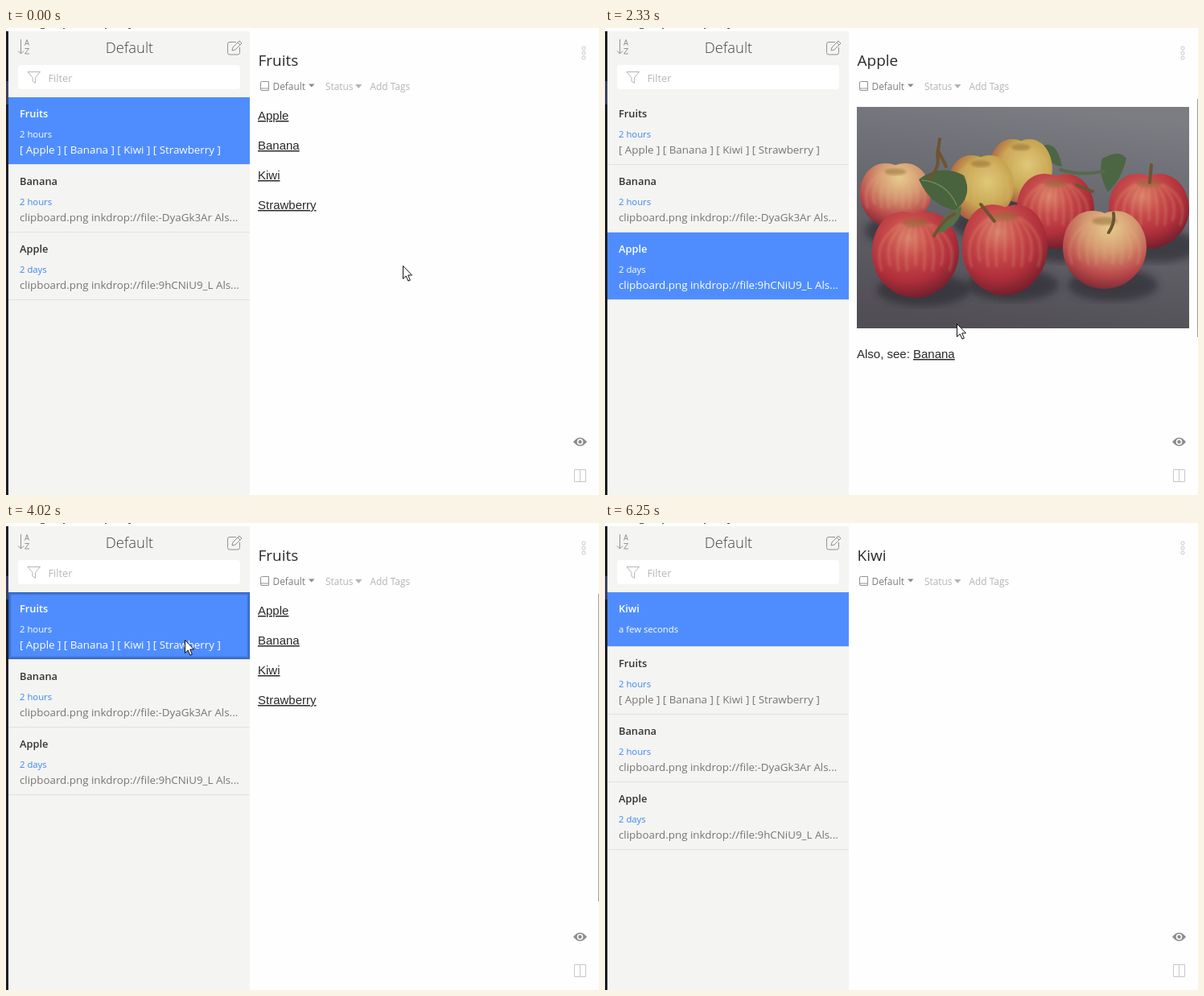
Recreate the animation shown at these times as an HTML page. Size 737 by 580 pixels, loop 6.78 s.

```html
<!DOCTYPE html>
<html lang="en">
<head>
<meta charset="utf-8">
<title>Linked notes</title>
<style>
html, body { margin: 0; width: 100%; height: 100%; overflow: hidden; background: #fefefe; }
svg { display: block; width: 737px; height: 580px; }
text { font-family: "Open Sans", "Noto Sans", sans-serif; }
.body { font: 15px "Liberation Sans", Arial, sans-serif; fill: #2a2a2a; }
.link { text-decoration: underline; }
.head { font-size: 18.4px; font-weight: 300; fill: #444; }
.title { font-size: 19px; fill: #2b2b2b; }
.name { font-size: 12.8px; font-weight: 600; fill: #333; }
.age { font-size: 11.3px; fill: #3b87f0; }
.text { font-size: 13.35px; fill: #767676; }
.sel text { fill: #fff; }
.meta { font-size: 11.9px; }
.icon { fill: none; stroke: #929292; stroke-width: 1; }
</style>
</head>
<body>
<svg viewBox="0 0 737 580">
  <defs>
    <linearGradient id="table" x1=".6" x2=".4" y2="1">
      <stop offset="0" stop-color="#7b7d83"/><stop offset=".45" stop-color="#66666d"/><stop offset="1" stop-color="#514e55"/>
    </linearGradient>
    <radialGradient id="red" cx=".42" cy=".3" r=".72">
      <stop offset="0" stop-color="#d9806a"/><stop offset=".35" stop-color="#c74a4a"/><stop offset=".7" stop-color="#b02f3b"/><stop offset="1" stop-color="#6f1f2c"/>
    </radialGradient>
    <radialGradient id="gold" cx=".6" cy=".4" r=".7">
      <stop offset="0" stop-color="#ddcb78"/><stop offset=".55" stop-color="#c7a550"/><stop offset="1" stop-color="#a34a3e"/>
    </radialGradient>
    <radialGradient id="blush" cx=".56" cy=".22" r=".8">
      <stop offset="0" stop-color="#e6cf8e"/><stop offset=".4" stop-color="#d39670"/><stop offset=".75" stop-color="#bb4a4b"/><stop offset="1" stop-color="#7c2a34"/>
    </radialGradient>
    <linearGradient id="peel" x1=".3" x2=".5" y2="1">
      <stop offset="0" stop-color="#eac63c"/><stop offset=".5" stop-color="#f8cf36"/><stop offset=".8" stop-color="#eab81f"/><stop offset="1" stop-color="#c98e10"/>
    </linearGradient>
    <filter id="soft"><feGaussianBlur stdDeviation="5"/></filter>
    <filter id="haze"><feGaussianBlur stdDeviation="1.6"/></filter>
    <clipPath id="photo"><rect x="313" y="98" width="413" height="275"/></clipPath>
  </defs>

  <rect width="737" height="580" fill="#fefefe"/>
  <rect x="3" y="4" width="300" height="576" fill="#f4f4f2"/>
  <path d="M0 4H3V580H0Z" fill="#1b1c27"/>
  <path d="M0 66H3V95H0Z" fill="#3b4160"/>
  <path d="M43 .5h5M71 .5h2M123 .5h2M152 .5h3" stroke="#555"/>

  <g class="icon">
    <path d="M18.5 14V32M15 28.5L18.5 32 22 28.5"/>
    <path d="M23.500 21.500L26 14.500 28.500 21.500M24.500 19.500H27.500M23.500 25.500H28.500L23.500 32H29"/>
    <path d="M286 17.500H278Q275.500 17.500 275.500 20V30.500Q275.500 33 278 33H288Q290.500 33 290.500 30.500V24M281 28L282 24 290 16 293 19 285 27ZM288 18L291 21"/>
  </g>
  <text class="head" x="153.500" y="30.500" text-anchor="middle">Default</text>
  <rect x="15" y="46" width="276" height="30" rx="4" fill="#fff"/>
  <path class="icon" d="M27 54.500H42.500L36.500 61.500V68.500L33 66V61.500Z" style="stroke:#b4b4b4"/>
  <text x="52.500" y="67" font-size="12.800" fill="#b6b6b6">Filter</text>

  <g class="meta">
    <path class="icon" d="M318.500 66.500H326.500V77.500H318Q316.500 77.500 316.500 76V68Q316.500 66.500 318.500 66.500ZM317 75H326.500"/>
    <text x="331.500" y="77" fill="#7c7c7c">Default</text>
    <path d="M376 69.500H383.500L379.750 73.500Z" fill="#888"/>
    <text x="397" y="77" fill="#b4b4b4">Status</text>
    <path d="M434 70H442.500L438.250 75Z" fill="#b5b5b5"/>
    <text x="452.500" y="77" fill="#b4b4b4">Add Tags</text>
  </g>
  <g class="icon" style="stroke:#c8c8c8">
    <circle cx="718" cy="25" r="2.100"/><circle cx="718" cy="31" r="2.100"/><circle cx="718" cy="37" r="2.100"/>
    <path d="M706.500 548.500H720.500V563.500H706.500ZM713.500 548.500V563.500"/>
  </g>
  <path d="M705 514Q713.500 503.500 722 514Q713.500 524.500 705 514Z" fill="#8c8c8c"/>
  <circle cx="713.500" cy="514" r="3" fill="#8c8c8c" stroke="#fefefe" stroke-width="1.600"/>

  <g id="list"></g>
  <g id="note"></g>
  <rect id="bar" x="736" y="88" width="1" fill="#a2a2a2"/>

  <g id="cursor" fill="#fff" stroke="#111" stroke-linejoin="round">
    <path id="arrow" d="M.5.5V16.500L4.200 13 6.900 19.200 9.300 18.200 6.700 12H11.500Z"/>
    <g id="hand">
      <path d="M-1 12.500V2Q-1 .5.700.5T2.400 2V8Q3 6.800 4.300 7 5.600 7.300 5.700 8.700 6.500 7.700 7.700 8.100 8.800 8.500 8.900 9.800 11.500 9 11.600 11.500V16Q11.500 18 10 20V23H1V20.500L-4 13.500Q-5.300 11 -3.500 10.400Q-2.400 10.300 -1 12.500Z"/>
      <path d="M2.400 8V12M5.700 8.700V12.500M8.900 9.800V12.500" fill="none"/>
    </g>
  </g>
</svg>
<script>
const LOOP = 6780;
const $ = id => document.getElementById(id);

const rows = {
  Kiwi: ['a few seconds', ''],
  Fruits: ['2 hours', '[ Apple ] [ Banana ] [ Kiwi ] [ Strawberry ]'],
  Banana: ['2 hours', 'clipboard.png inkdrop://file:-DyaGk3Ar Als...'],
  Apple: ['2 days', 'clipboard.png inkdrop://file:9hCNiU9_L Als...']
};

// start, selected row, open note, scrollbar length, row focus
const states = [
  [0, 'Fruits', 'Fruits', 0],
  [430, 'Fruits', 'Fruits', 382],
  [1430, 'Apple', 'Fruits', 382],
  [1520, 'Apple', 'Apple', 296],
  [2940, 'Banana', 'Apple', 296],
  [3000, 'Banana', 'Banana', 285],
  [3870, 'Fruits', 'Banana', 285, true],
  [3960, 'Fruits', 'Fruits', 382, true],
  [4910, 'Fruits', 'Fruits', 382],
  [5060, '', 'Fruits', 382],
  [5210, 'Kiwi', 'Kiwi', 0]
];

// start, end, from, bend, to, easing power
const moves = [
  [400, 1060, [493, 295], [390, 170], [328, 104], 2],
  [2100, 2330, [328, 104], [400, 235], [437, 367], 1.4],
  [2330, 2690, [437, 367], [434, 398], [417, 408], 1.6],
  [3280, 3420, [417, 408], [345, 315], [270, 220], 1.2],
  [3420, 3480, [270, 220], [258, 200], [252, 188], 1],
  [3690, 3810, [252, 188], [238, 165], [222, 145], 1.5],
  [4020, 4340, [222, 145], [290, 195], [349, 219], 1.8],
  [4400, 4630, [349, 219], [350, 203], [338, 189], 1.6],
  [5270, 5610, [338, 189], [220, 150], [128, 114], 1.8],
  [5860, 6190, [128, 114], [415, 405], [655, 478], 1.3],
  [6190, 6250, [655, 478], [684, 500], [690, 582], 1]
];

// link text and its box: left, baseline, width
const links = {
  Fruits: [['Apple', 313, 114, 38], ['Banana', 313, 151, 52], ['Kiwi', 313, 188, 28], ['Strawberry', 313, 225, 73]],
  Apple: [['Banana', 383, 410, 52]],
  Banana: [['Apple', 382, 444, 38]],
  Kiwi: []
};

const path = (d, fill, more = '') => `<path d="${d}" fill="${fill}" ${more}/>`;
const line = (d, stroke, width, more = '') =>
  path(d, 'none', `stroke="${stroke}" stroke-width="${width}" stroke-linecap="round" ${more}`);
const text = (cls, x, y, s) => `<text class="${cls}" x="${x}" y="${y}">${s}</text>`;
const oval = (x, y, rx, ry, fill, more = '') =>
  `<ellipse cx="${x}" cy="${y}" rx="${rx}" ry="${ry}" fill="${fill}" ${more}/>`;

// rounded shoulders, narrower base, pale streaks running down from the stem
function apple([x, y, rx, ry, id]) {
  let streaks = '';
  for (let i = -4; i < 5; i++) {
    const dx = i * rx / 4.6;
    streaks += `M${x + dx * .4} ${y - ry * .7}Q${x + dx * 1.15} ${y - ry * .3} ${x + dx * .9} ${y + ry * (.25 + i * i % 3 * .12)}`;
  }
  const body = `M${x} ${y - ry * .92}C${x + rx * .6} ${y - ry * 1.15} ${x + rx} ${y - ry * .6} ${x + rx} ${y - ry * .05}`
    + `S${x + rx * .55} ${y + ry} ${x} ${y + ry}S${x - rx} ${y + ry * .55} ${x - rx} ${y - ry * .05}`
    + `S${x - rx * .6} ${y - ry * 1.15} ${x} ${y - ry * .92}Z`;
  return path(body, `url(#${id})`) + line(streaks, '#e9b183', 2.5, 'opacity=".3" filter="url(#haze)"')
    + oval(x, y - ry * .72, rx * .3, ry * .1, '#8f6a35', 'opacity=".5" filter="url(#haze)"');
}

function apples() {
  const fruit = [
    [517, 177, 39, 40, 'gold'], [361, 208, 44, 41, 'blush'], [467, 199, 41, 42, 'gold'],
    [676, 227, 50, 47, 'red'], [560, 227, 48, 47, 'red'], [386, 281, 54, 54, 'red'],
    [497, 275, 53, 57, 'red'], [621, 275, 52, 49, 'blush']
  ];
  const shade = fruit.map(([x, y, r]) => oval(x + 10, y + 44, r + 4, 20, '#2c2930', 'filter="url(#soft)" opacity=".65"'));
  const balls = fruit.map(apple);
  const stem = d => line(d, '#6d5431', 4);
  return `<g clip-path="url(#photo)"><rect x="313" y="98" width="413" height="275" fill="url(#table)"/>`
    + shade.join('')
    + path('M545 146Q562 140 568 172Q548 170 545 146ZM618 162Q640 150 648 162Q642 188 625 204Q612 180 618 162Z', '#4c6643')
    + line('M566 176Q590 184 620 178', '#566a4b', 4)
    + balls.slice(0, 5).join('')
    + path('M390 188Q416 168 446 183Q458 208 436 226Q405 222 390 188Z', '#48633d')
    + line('M394 189Q425 192 437 220', '#6f8855', 1.5)
    + balls.slice(5).join('')
    + path('M415 247Q421 229 443 222Q443 244 415 255Z', '#567049')
    + stem('M402 187Q417 174 413 158L416 138M415 154L424 172') + stem('M409 258Q420 238 434 231')
    + stem('M484 240L467 219') + stem('M626 254Q634 242 632 230') + stem('M677 192L679 170')
    + stem('M586 195L606 203') + '</g>';
}

function bananas() {
  const peel = d => path(d, 'url(#peel)', 'stroke="#b27c0e" stroke-width="1.2"');
  const glow = d => line(d, '#fce583', 7, 'opacity=".55" filter="url(#haze)"');
  const dusk = d => line(d, '#a87408', 6, 'opacity=".5" filter="url(#haze)"');
  const tip = (x, y) => oval(x, y, 4, 8, '#382b20');
  return path('M420 340Q480 378 560 346Q630 340 652 290L600 280Z', '#bdbdbd', 'filter="url(#soft)" opacity=".7"')
    + peel('M453 152C480 191 548 207 660 212Q680 216 680 230L674 240C615 252 520 236 450 172Z')
    + glow('M490 193Q560 222 655 222') + dusk('M492 205Q560 240 650 243')
    + peel('M450 160C490 214 560 244 662 245L674 250 672 263C615 299 530 293 452 205Z')
    + glow('M485 214Q545 258 645 257') + dusk('M490 240Q550 292 625 280')
    + peel('M441 172C418 225 438 285 494 318C535 338 595 338 632 318L636 303C588 296 530 276 498 245C478 224 468 194 453 165Z')
    + glow('M443 200Q450 245 500 278Q540 300 610 308') + dusk('M434 245Q458 300 515 321Q570 334 615 322')
    + peel('M432 162C393 181 371 215 378 258C386 304 420 345 466 352C500 356 532 350 541 333L539 318C504 316 473 302 451 275C425 245 424 204 444 164Z')
    + glow('M405 205Q398 262 445 305Q475 328 520 328') + dusk('M388 275Q412 332 470 345Q505 348 530 341')
    + path('M430 158L457 154 464 184Q453 176 449 190Q443 178 436 196Q430 186 418 187Z', '#8f9a35', 'opacity=".75" filter="url(#haze)"')
    + path('M427 145L440 142 458 144 463 152 455 157 448 166 437 164 424 167Z', '#493026')
    + tip(676, 230) + tip(671, 255) + tip(633, 311) + tip(538, 327);
}

const pictures = { Apple: apples(), Banana: bananas() };

function drawList(sel, focus, withKiwi) {
  let y = 86, out = '';
  for (const [name, [age, body]] of Object.entries(rows)) {
    if (name === 'Kiwi' && !withKiwi) continue;
    const h = body ? 83 : 67, on = name === sel;
    out += `<g class="${on ? 'sel' : ''}" transform="translate(3 ${y})">`;
    if (on) out += `<rect width="300" height="${h}" fill="#4f8dff"/>`;
    if (on && focus) for (let i = 0; i < 4; i++)
      out += `<rect x="${i + .5}" y="${i + .5}" width="${299 - 2 * i}" height="${h - 1 - 2 * i}" fill="none" stroke="#17458f" opacity="${.55 - .14 * i}"/>`;
    out += `<rect y="${h}" width="300" height="1" fill="#e1e1df"/>`
      + text('name', 14, 25, name) + text('age', 14, 50, age) + text('text', 14, 70, body) + '</g>';
    y += h + 1;
  }
  $('list').innerHTML = out;
}

function drawNote(name) {
  let out = text('title', 313.5, 47, name) + (pictures[name] || '');
  if (pictures[name]) out += text('body', 313, links[name][0][2], 'Also, see:');
  for (const [s, x, y] of links[name]) out += text('body link', x, y, s);
  $('note').innerHTML = out;
}

function ease(k, p) {
  return k < .5 ? (2 * k) ** p / 2 : 1 - (2 - 2 * k) ** p / 2;
}

function pointer(t) {
  const m = moves.filter(v => v[0] <= t).pop();
  if (!m) return moves[0][2];
  const [start, end, a, b, c, power] = m;
  const k = ease(Math.min(1, (t - start) / (end - start)), power);
  return a.map((v, i) => (1 - k) ** 2 * v + 2 * k * (1 - k) * b[i] + k * k * c[i]);
}

let shown;
function render(t) {
  const state = states.filter(s => s[0] <= t).pop();
  const [, sel, note, bar, focus] = state;
  if (state !== shown) {
    drawList(sel, focus, note === 'Kiwi');
    drawNote(note);
    $('bar').setAttribute('height', bar);
    shown = state;
  }
  const [x, y] = pointer(t).map(Math.round);
  const over = links[note].some(([, lx, ly, w]) => x >= lx && x <= lx + w && y >= ly - 14 && y <= ly + 4);
  $('arrow').style.display = over ? 'none' : '';
  $('hand').style.display = over ? '' : 'none';
  $('cursor').setAttribute('transform', `translate(${x} ${y})`);
}

let began;
function tick(now) {
  began ??= now;
  render((now - began) % LOOP);
  requestAnimationFrame(tick);
}
render(0);
requestAnimationFrame(tick);
</script>
</body>
</html>
```
